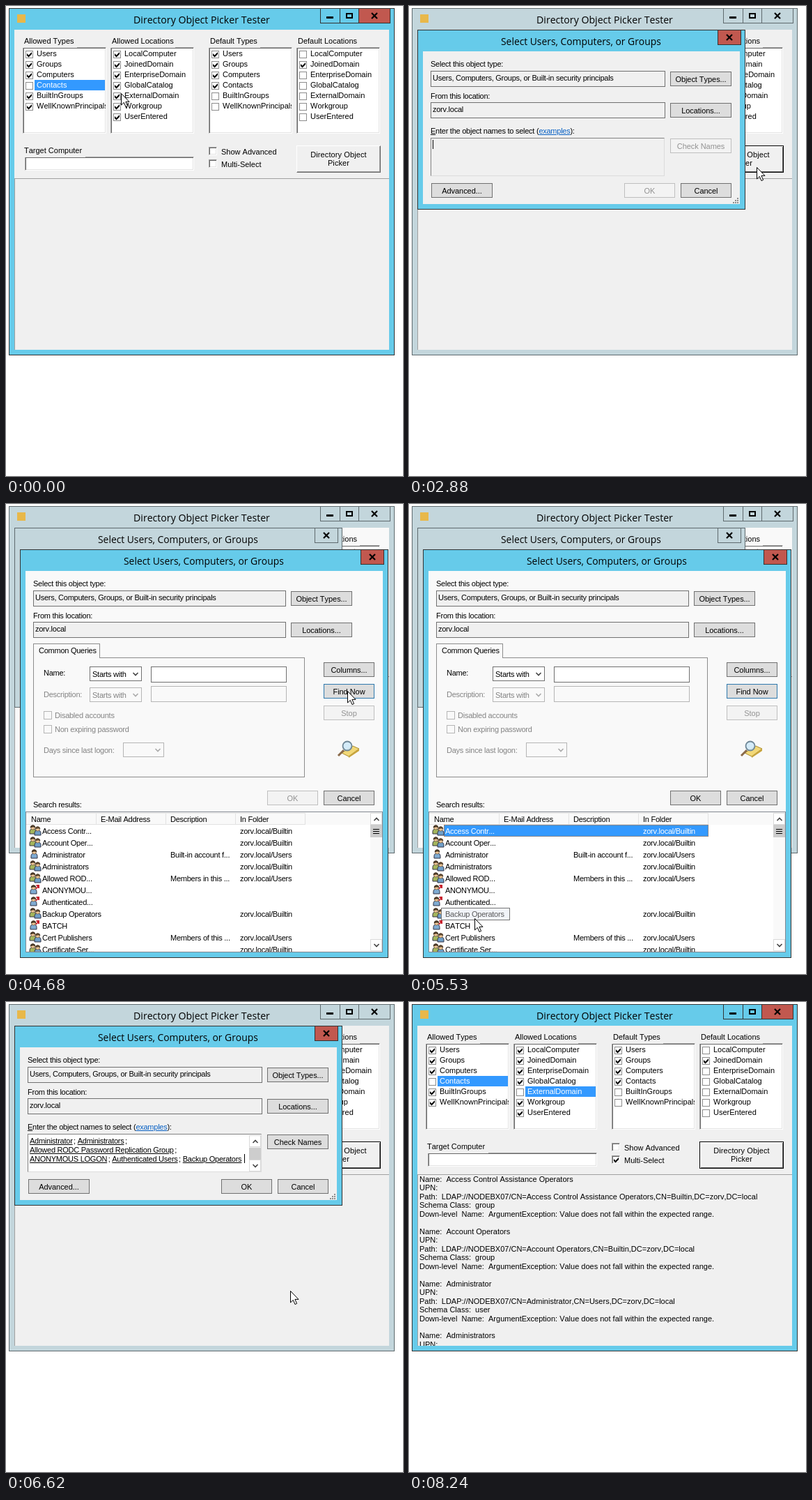
Animation, 570 px wide and 674 px high, one loop 8.61 s. Source, as an HTML page:

```html
<!DOCTYPE html>
<html lang="en">
<head>
<meta charset="utf-8">
<title>Directory Object Picker Tester</title>
<style>
html, body { margin: 0; width: 100%; height: 100%; overflow: hidden; background: #fff; }
#stage { position: absolute; left: 0; top: 0; width: 570px; height: 674px; overflow: hidden;
  font: 11px "Liberation Sans", Arial, sans-serif; font-kerning: none; color: #000; }
div, span, svg { position: absolute; box-sizing: border-box; }
span { white-space: pre; line-height: 14px; }
svg { overflow: visible; }
.layer { inset: 0; --f: #66cbea; --line: #333; --red: #c1584f; --c: #f0f0f0; }
.layer.off { --f: #c3d6dc; --line: #5f6a6e; --red: #c3d6dc; }
.layer.pale { --c: #f9f9f9; }
.dlg { letter-spacing: -.25px; }
.frame { background: var(--f); border: 1px solid var(--line); }
.client, .tag { background: var(--c); }
.cap { border: 1px solid var(--line); }
.close { background: var(--red); }
.badge { background: #e8b84a; }
.title { font-family: "Open Sans", "Noto Sans", sans-serif; line-height: 18px; letter-spacing: 0; }
.sunk { background: #fff; border: 1px solid; border-color: #a0a0a0 #fff #fff #a0a0a0; overflow: hidden;
  box-shadow: inset 1px 1px #696969, inset -1px -1px #e3e3e3; }
.cell { background: #fff; border: 1px solid #8c8c8c; }
.item { padding-left: 3px; line-height: 14px; white-space: nowrap; }
.item.hl { background: #39f; color: #fff; }
.big { background: #f0f0f0; border: 1px solid; border-color: #fff #696969 #696969 #fff;
  box-shadow: inset -1px -1px #a0a0a0; text-align: center; line-height: 12px; padding-top: 6px; letter-spacing: .1px; }
.big.def { border-color: #000; box-shadow: inset 1px 1px #fff, inset -1px -1px #696969; }
.out { border: solid #a0a0a0; border-width: 1px 0 0 1px; overflow: hidden; }
.log { white-space: pre; line-height: 12.47px; }
.btn { background: #ddd; border: 1px solid #707070; text-align: center; line-height: 20px; letter-spacing: -.05px; }
.btn.dis { background: #f3f3f3; border-color: #bfbfbf; color: #929292; }
.btn.blue { border-color: #2f79ad; }
.field { background: #f0f0f0; border: 1px solid #707070; }
.field.focus { border-color: #2d6c9c; }
.focus .val { background: #39f; color: #fff; }
.white { background: #fff; border: 1px solid #707070; }
.paper { background: #fff; }
.faint { border: 1px solid #b5b5b5; }
.gray { color: #838383; }
.edit { background: #f0f0f0; border: 1px solid; border-color: #828282 #dcdcdc #dcdcdc #828282; }
.edit.full { background: #fff; }
.names u { margin-right: 1.5px; }
.link { color: #0a62c4; }
.line { background: #8c8c8c; }
.black { background: #000; }
.sep { background: #e2e2e2; }
.tab { background: var(--c); border: 1px solid #8c8c8c; border-bottom: 0; }
.panel { border: 1px solid #8c8c8c; }
.list { background: var(--c); border: 1px solid #828790; overflow: hidden; }
.mark { border: 1px dotted transparent; }
.sel .mark { background: #39f; }
.sel.last .mark { border-color: #d0701c; }
.sel span { color: #fff; }
.tip { background: #f1f4f9; border: 1px solid #767676; color: #5a5a5a; }
.track { background: var(--c); }
.arrow { background: #fff; border: 1px solid #dadada; }
.thumb { background: #cdcdcd; }
</style>
</head>
<body>
<div id="stage"></div>
<script>
const LOOP = 8610;
const DOMAIN = 'zorv', HOST = 'NODEBX07';

const box = (x, y, w, h, cls = '', inner = '', attr = '') =>
  `<div class="${cls}" ${attr} style="left:${x}px;top:${y}px;width:${w}px;height:${h}px">${inner}</div>`;
const txt = (x, cy, s, cls = '') => `<span class="${cls}" style="left:${x}px;top:${cy - 7}px">${s}</span>`;
const svg = (x, y, inner, attr = '') =>
  `<svg ${attr} width="1" height="1" style="left:${x}px;top:${y}px">${inner}</svg>`;
const during = (a, b) => `data-t="${a} ${b}"`;
const tick = (x, y, attr = '') => svg(x, y, '<path d="M0 2l2.5 2.5L7 0v3L2.5 7.4 0 5z"/>', attr);
const chevron = (x, y, up, color = '#444') =>
  svg(x, y, `<path d="${up ? 'M-3.5 2L0-1.5 3.5 2' : 'M-3.5-2L0 1.5 3.5-2'}" fill="none" stroke="${color}" stroke-width="1.6"/>`);
const btn = (x, y, w, label, cls = '', id = '') => box(x, y, w, 21, 'btn ' + cls, label, id && `id="${id}"`);

function frame(x, y, w, h, title, tx, size) {
  const r = x + w - 6;
  const cw = size > 14 ? 46 : 34;
  return box(x, y, w, h, 'frame') + box(x + 8, y + 31, w - 16, h - 39, 'client') +
    `<span class="title" style="left:${tx}px;top:${y + 8}px;font-size:${size}px">${title}</span>` +
    box(r - cw, y, cw, 22, 'cap close') +
    svg(r - cw / 2 - 4, y + 7, '<path d="M0 0L8 8M8 0L0 8" stroke="#000" stroke-width="2.2"/>');
}

// main window
const TYPES = ['Users', 'Groups', 'Computers', 'Contacts', 'BuiltInGroups', 'WellKnownPrincipals'];
const PLACES = ['LocalComputer', 'JoinedDomain', 'EnterpriseDomain', 'GlobalCatalog', 'ExternalDomain', 'Workgroup', 'UserEntered'];

function checkList(x, label, labelW, items, checks, hl, live) {
  const rows = items.map((s, i) => {
    const on = i === live ? tick(1, 1, during(0, 840)) : checks[i] === '1' ? tick(1, 1) : '';
    return box(3, 4 + 15 * i, 11, 11, 'cell', on) +
      box(16, 1 + 15 * i, 101, 15, 'item' + (i === hl ? ' hl' : ''), s, i === live ? 'id="ext"' : '');
  });
  return box(x, 59, 120, 124, 'sunk', rows.join('')) +
    box(x, 43, labelW, 17, 'tag', txt(2, 7, label));
}

const entry = (name, folder, kind) =>
  `Name:  ${name}\nUPN:\nPath:  LDAP://${HOST}/CN=${name},CN=${folder},DC=${DOMAIN},DC=local\n` +
  `Schema Class:  ${kind}\nDown-level  Name:  ArgumentException: Value does not fall within the expected range.\n\n`;
const log = entry('Access Control Assistance Operators', 'Builtin', 'group') +
  entry('Account Operators', 'Builtin', 'group') +
  entry('Administrator', 'Users', 'user') +
  entry('Administrators', 'Builtin', 'group');

const mainWin = frame(4, 3, 554, 498, 'Directory Object Picker Tester', 183, 14.15) +
  box(16, 12, 12, 12, 'badge') +
  box(451, 3, 29, 22, 'cap') + box(479, 3, 28, 22, 'cap') +
  box(460, 15, 10, 3, 'black') +
  svg(489, 11, '<path d="M0 0H8V6H0Z" fill="none" stroke="#000" stroke-width="2"/>') +
  checkList(24, 'Allowed Types', 78, TYPES, '111011', 3) +
  checkList(150, 'Allowed Locations', 93, PLACES, '1111111', -1, 4) +
  checkList(291, 'Default Types', 74, TYPES, '111100') +
  checkList(417, 'Default Locations', 91, PLACES, '0100000') +
  box(27, 216, 243, 20, 'sunk') + box(24, 200, 90, 17, 'tag', txt(2, 7, 'Target Computer')) +
  box(291, 202, 12, 12, 'sunk') + txt(309, 209, 'Show Advanced') +
  box(291, 220, 12, 12, 'sunk', tick(2, 2, during(2180, LOOP))) + txt(309, 227, 'Multi-Select') +
  box(417, 200, 121, 39, 'big', 'Directory Object<br>Picker', 'id="pick"') +
  box(12, 247, 538, 246, 'out', box(2, 0, 534, 300, 'log', log, during(7400, LOOP)));

// dialogs
const PRINCIPALS = 'Users, Computers, Groups, or Built-in security principals';
const field = (x, y, w, text, id = '') =>
  box(x, y, w, 23, 'field', `<span class="val" style="left:2px;top:2px">${text}</span>`, id && `id="${id}"`);

const heading = (x, y, w, id) =>
  txt(x, y, 'Select this object type:') + field(x, y + 10, w, PRINCIPALS, id) +
  btn(x + w + 7, y + 11, 88, 'Object Types...') +
  txt(x, y + 46, 'From this location:') + field(x, y + 55, w, DOMAIN + '.local') +
  btn(x + w + 7, y + 56, 88, 'Locations...');

const scroll = (x, y, h, ty, th) => box(x, y, 17, h, 'track') +
  box(x, y, 17, 17, 'arrow') + chevron(x + 8.5, y + 9, true) +
  box(x, y + h - 17, 17, 17, 'arrow') + chevron(x + 8.5, y + h - 8, false) +
  box(x, ty, 17, th, 'thumb');

const names = list => list.split(',').map(s => `<u>${s}</u>`).join('; ');
let grip = '';
for (let i = 0; i < 3; i++)
  for (let j = 0; j <= i; j++) grip += box(471 - 3 * j, 275 + 3 * i, 1.5, 1.5, 'line');

const picker = frame(12, 34, 471, 258, 'Select Users, Computers, or Groups', 132, 13.87) +
  heading(31, 83, 337) +
  txt(31, 179, '<u>E</u>nter the object names to select (<u class="link">examples</u>):') +
  box(31, 189, 336, 55, 'edit', '', 'id="edit"') +
  box(34, 192, 1, 13, 'black', '', during(0, 6600)) +
  box(0, 0, 0, 0, 'names',
    txt(34, 199, names('Administrator,Administrators') + ';') +
    txt(34, 212, names('Allowed RODC Password Replication Group') + ';') +
    txt(34, 225, names('ANONYMOUS LOGON,Authenticated Users,Backup Operators')) +
    box(342, 218, 1, 13, 'black') + scroll(349, 191, 52, 209, 17), during(6600, LOOP)) +
  btn(375, 190, 88, 'Check Names', 'dis', 'check') +
  btn(32, 254, 88, 'Advanced...') + btn(309, 254, 73, 'OK', 'dis', 'ok1') + btn(390, 254, 73, 'Cancel') + grip;

const person = (x, y, coat, hair) =>
  `<path d="M${x} ${y + 13}v-3q0-4 4.5-4t4.5 4v3z" fill="${coat}" stroke="#334"/>` +
  `<circle cx="${x + 4.5}" cy="${y + 4}" r="3" fill="#efc796" stroke="#5b4630" stroke-width=".6"/>` +
  `<path d="M${x + 1.2} ${y + 4}a3.3 3.3 0 0 1 6.6 0q-2.2-2.2-6.6 0z" fill="${hair}" stroke="${hair}"/>`;
const ICONS = {
  g: person(0, 0, '#a5b65c', '#4b3a28') + person(7, 2, '#6f9fc8', '#5b4630'),
  u: person(2, 1, '#7fabd2', '#4b3a28'),
  w: person(1, 1, '#7fabd2', '#4b3a28') +
    '<path d="M9 7l4-5M9.5 2H13v4" fill="none" stroke="#c8202c" stroke-width="2"/>',
};
const FOUND = [
  ['g', 'Access Contr...', '', 'Builtin'], ['g', 'Account Oper...', '', 'Builtin'],
  ['u', 'Administrator', 'Built-in account f...', 'Users'], ['g', 'Administrators', '', 'Builtin'],
  ['g', 'Allowed ROD...', 'Members in this ...', 'Users'], ['w', 'ANONYMOU...', '', ''],
  ['w', 'Authenticated...', '', ''], ['g', 'Backup Operators', '', 'Builtin'], ['w', 'BATCH', '', ''],
  ['g', 'Cert Publishers', 'Members of this ...', 'Users'], ['g', 'Certificate Ser...', '', 'Builtin'],
];
const found = FOUND.map(([icon, name, note, folder], i) =>
  box(0, 18 + 17 * i, 401, 17, 'row', box(21, 0, 380, 17, 'mark') + svg(5, 0, ICONS[icon]) +
    txt(23, 9, name) + txt(207, 9, note) + txt(307, 9, folder && `${DOMAIN}.local/${folder}`))).join('');
const header = ['Name', 'E-Mail Address', 'Description', 'In Folder'].map((s, i) =>
  txt(7 + 100 * i, 10, s) + box(100 + 100 * i, 2, 1, 16, 'sep')).join('');

const combo = (x, y, w, s, dim) =>
  box(x, y, w, 21, dim ? 'faint gray' : 'white', txt(3, 10, s) + chevron(w - 10, 10, false, dim ? '#aaa' : '#444'));
const option = (y, s) => box(54, y - 6, 12, 12, 'faint') + txt(70, y, s, 'gray');

const search = frame(20, 65, 529, 586, 'Select Users, Computers, or Groups', 169, 13.87) +
  heading(39, 114, 363, 'type') +
  box(39, 220, 390, 172, 'panel') + box(39, 200, 96, 21, 'tab', txt(7, 9, 'Common Queries')) +
  txt(54, 242, 'Name:') + combo(120, 233, 75, 'Starts with') + box(208, 233, 195, 23, 'white') +
  txt(54, 273, 'Description:', 'gray') + combo(120, 263, 75, 'Starts with', true) + box(208, 261, 195, 23, 'faint') +
  option(303, 'Disabled accounts') + option(323, 'Non expiring password') +
  txt(54, 353, 'Days since last logon:', 'gray') + combo(168, 342, 59, '', true) +
  btn(456, 227, 73, 'Columns...') + btn(456, 258, 73, 'Find Now', '', 'find') + btn(456, 289, 73, 'Stop', 'dis') +
  svg(476, 339, '<path d="M6 18L22 8l9 4-15 11z" fill="#f2d878" stroke="#a98b2c"/>' +
    '<path d="M16 23l15-11v3L16 25z" fill="#c9a53c"/><path d="M9 14L1 22" stroke="#8a6a4a" stroke-width="3"/>' +
    '<circle cx="14" cy="8" r="6.5" fill="#cfe9f7" fill-opacity=".9" stroke="#6f8796" stroke-width="1.8"/>') +
  btn(375, 411, 73, 'OK', 'dis', 'ok2') + btn(456, 411, 73, 'Cancel') +
  txt(39, 431, 'Search results:') +
  box(28, 441, 513, 202, 'list', box(0, 1, 401, 1, 'sep') + box(0, 17, 401, 1, 'sep') + header +
    box(0, 0, 511, 200, '', box(0, 18, 494, 182, 'paper') + found +
      scroll(494, 1, 198, 18, 18) +
      [24, 27, 30].map(y => box(498, y, 9, 1, 'black')).join(''), during(4530, LOOP))) +
  box(46, 579, 99, 18, 'tip', txt(5, 8, 'Backup Operators'), during(5390, 5790));

const stage = document.getElementById('stage');
stage.innerHTML =
  `<div class="layer" id="main">${mainWin}</div>` +
  `<div class="layer dlg" id="picker" ${during(2700, 7400)}>${picker}</div>` +
  `<div class="layer dlg pale" id="search" ${during(3550, 6600)}>${search}</div>` +
  svg(0, 0, '<path d="M.5.5V17L4.3 13.4 7 19.6 9.6 18.4 6.9 12.4H12z" fill="#fff" stroke="#000"/>', 'id="cursor"');

// timeline: class changes, pointer path and the moments the screen refreshes
const CLASSES = [
  ['main', 'off', 2700, 7400], ['main', 'pale', 3550, 6600], ['picker', 'off', 3550, 6600],
  ['ext', 'hl', 260, LOOP], ['pick', 'def', 2590, LOOP],
  ['edit', 'full', 6600, LOOP], ['check', 'dis', 0, 6600], ['ok1', 'dis', 0, 6600],
  ['type', 'focus', 3550, 4390], ['find', 'blue', 4390, 6200], ['ok2', 'dis', 0, 4960],
].map(([id, cls, a, b]) => [document.getElementById(id), cls, a, b]);

const PATH = [
  [0, 165, 125], [400, 160, 130], [985, 160, 130], [1930, 291, 228], [2190, 302, 222],
  [2597, 499, 231], [2880, 499, 231], [3280, 85, 264], [3560, 85, 264], [3840, 321, 259],
  [4260, 490, 268], [4540, 490, 268], [4970, 75, 468], [5110, 75, 468], [5530, 94, 594],
  [5800, 94, 590], [6490, 408, 414], [6620, 408, 414], [7280, 350, 269], [7650, 350, 269], [8090, 494, 621], [LOOP, 494, 621],
];
const BEATS = [
  [0, 0, 1], [130, 400, 3], [850, 850, 1], [1120, 1930, 7], [2190, 3140, 8], [3280, 4260, 8],
  [4400, 5400, 8], [5530, 6490, 8], [6620, 7540, 8], [7800, 8240, 4],
];

function beat(t) {
  const [a, b, n] = BEATS.filter(g => g[0] <= t).pop();
  const gap = (b - a) / (n - 1) || 1;
  return a + gap * Math.floor((Math.min(t, b) - a) / gap + 1e-6);
}

function pointer(t) {
  const i = PATH.findIndex(p => p[0] > t);
  const [t0, x0, y0] = PATH[i - 1], [t1, x1, y1] = PATH[i];
  const k = (t - t0) / (t1 - t0), e = k * k * (3 - 2 * k);
  return [Math.round(x0 + (x1 - x0) * e), Math.round(y0 + (y1 - y0) * e)];
}

const timed = [...stage.querySelectorAll('[data-t]')].map(el => [el, ...el.dataset.t.split(' ').map(Number)]);
const rows = [...stage.querySelectorAll('.row')];
const cursor = document.getElementById('cursor');
let shown = -1;

function render(t) {
  if (t === shown) return;
  shown = t;
  for (const [el, a, b] of timed) el.style.display = t >= a && t < b ? '' : 'none';
  for (const [el, cls, a, b] of CLASSES) el.classList.toggle(cls, t >= a && t < b);
  const count = t < 4960 ? 0 : t < 5790 ? 1 : 8;
  rows.forEach((row, i) => {
    row.classList.toggle('sel', i < count);
    row.classList.toggle('last', i === count - 1);
  });
  const [x, y] = pointer(t);
  cursor.style.transform = `translate(${x}px,${y}px)`;
  cursor.style.display = t < 8230 ? '' : 'none';
}

const start = performance.now();
function loop(now) {
  render(beat(Math.max(0, now - start) % LOOP));
  requestAnimationFrame(loop);
}
render(0);
requestAnimationFrame(loop);
</script>
</body>
</html>
```
